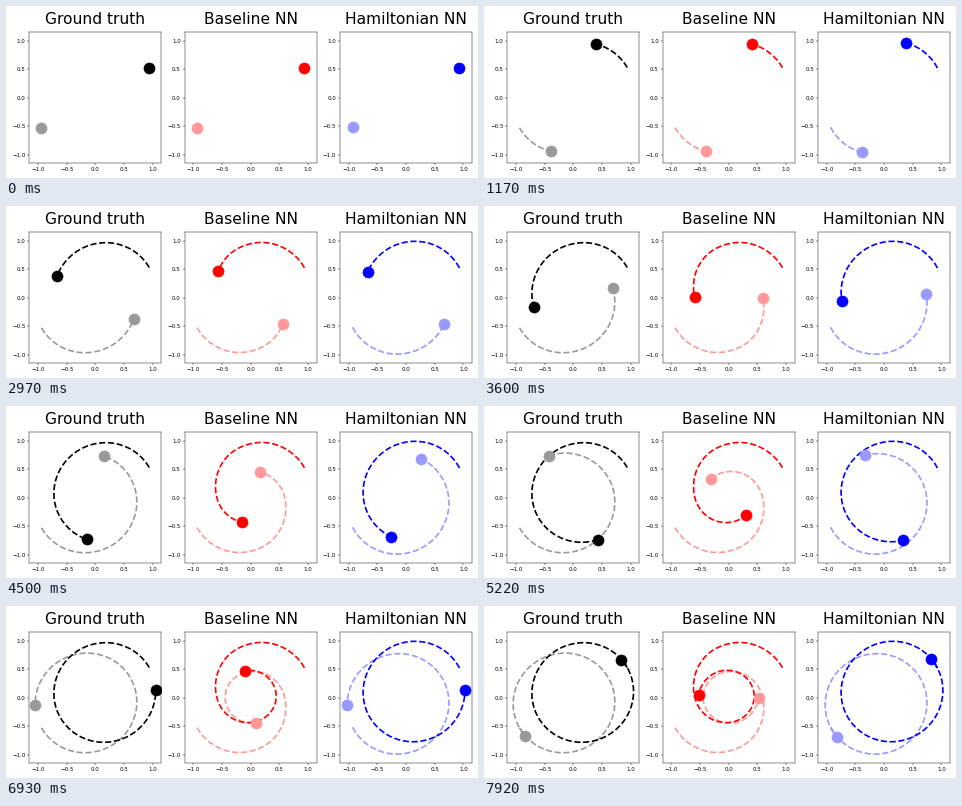
Animation of 472x172 px, one loop 8 s. Source, as a matplotlib script:

```python
import numpy as np
import matplotlib.pyplot as plt
from matplotlib.animation import FuncAnimation

W, H, DPI = 472, 172, 40
FRAMES, LOOP = 89, 8000
LIM = 1.15
LEFT, BOTTOM, WIDTH, HEIGHT, STEP = 23.39, 14.89, 131.94, 130.81, 155.33
t = np.arange(FRAMES) * 0.09  # seconds


def kepler(a, e, apo, m0, rate):
    """Ellipse focused on the origin; angles in degrees, counted from the far point."""
    m = np.radians(m0 + rate * t)
    u = m.copy()
    for _ in range(20):
        u -= (u + e * np.sin(u) - m) / (1 + e * np.cos(u))
    along = a * (np.cos(u) + e)
    across = a * np.sqrt(1 - e * e) * np.sin(u)
    c, s = np.cos(np.radians(apo)), np.sin(np.radians(apo))
    return np.array([along * c - across * s, along * s + across * c])


def smooth(keys, vals):
    """Cubic Hermite curve through a few keys."""
    keys, vals = np.array(keys), np.array(vals)
    slope = np.gradient(vals, keys, edge_order=2)
    i = np.clip(np.searchsorted(keys, t, side="right") - 1, 0, len(keys) - 2)
    h = keys[i + 1] - keys[i]
    s = (t - keys[i]) / h
    return ((1 + 2 * s) * (1 - s) ** 2 * vals[i] + s * (1 - s) ** 2 * h * slope[i]
            + s * s * (3 - 2 * s) * vals[i + 1] + s * s * (s - 1) * h * slope[i + 1])


def spiral():
    keys = [0, 1.17, 2.25, 3.6, 4.5, 5.94, 6.85, 7.92]
    r = smooth(keys, [1.075, 1.023, 0.885, 0.594, 0.465, 0.448, 0.467, 0.524])
    ang = np.radians(smooth(keys, [29.3, 66.8, 105.5, 179.2, 250.2, 378.7, 455, 537.7]))
    return np.array([r * np.cos(ang), r * np.sin(ang)])


truth = kepler(0.891, 0.21, 29.4, 0, 47.2)
hnn = kepler(0.894, 0.197, 38, -12.8, 47.42)
base = spiral()
drift = np.array([0 * t, 0.0025 * t])

panels = [
    ("Ground truth", "black", "#999999", truth, -truth),
    ("Baseline NN", "red", "#ff9999", base + drift, -base + drift),
    ("Hamiltonian NN", "blue", "#9999ff", hnn, -hnn),
]

fig = plt.figure(figsize=(W / DPI, H / DPI), dpi=DPI, facecolor="white")
bodies = []
for k, (title, dark, light, first, second) in enumerate(panels):
    ax = fig.add_axes([(LEFT + STEP * k) / W, BOTTOM / H, WIDTH / W, HEIGHT / H])
    ax.set(xlim=(-LIM, LIM), ylim=(-LIM, LIM))
    ticks = np.arange(-1, 1.1, 0.5)
    ax.set_xticks(ticks)
    ax.set_yticks(ticks)
    ax.set_title(title, fontsize=28, pad=15)
    for color, path, z in ((light, second, 2), (dark, first, 3)):
        trail, = ax.plot([], [], "--", color=color, lw=3, zorder=z)
        dot, = ax.plot([], [], "o", color=color, ms=20, zorder=z + 2)
        bodies.append((path, trail, dot))


def draw(i):
    for path, trail, dot in bodies:
        trail.set_data(path[:, :i + 1])
        dot.set_data(path[:, i:i + 1])
    return [artist for body in bodies for artist in body[1:]]


anim = FuncAnimation(fig, draw, frames=FRAMES, interval=LOOP / FRAMES,
                     repeat=True, repeat_delay=0)
plt.show()
```
